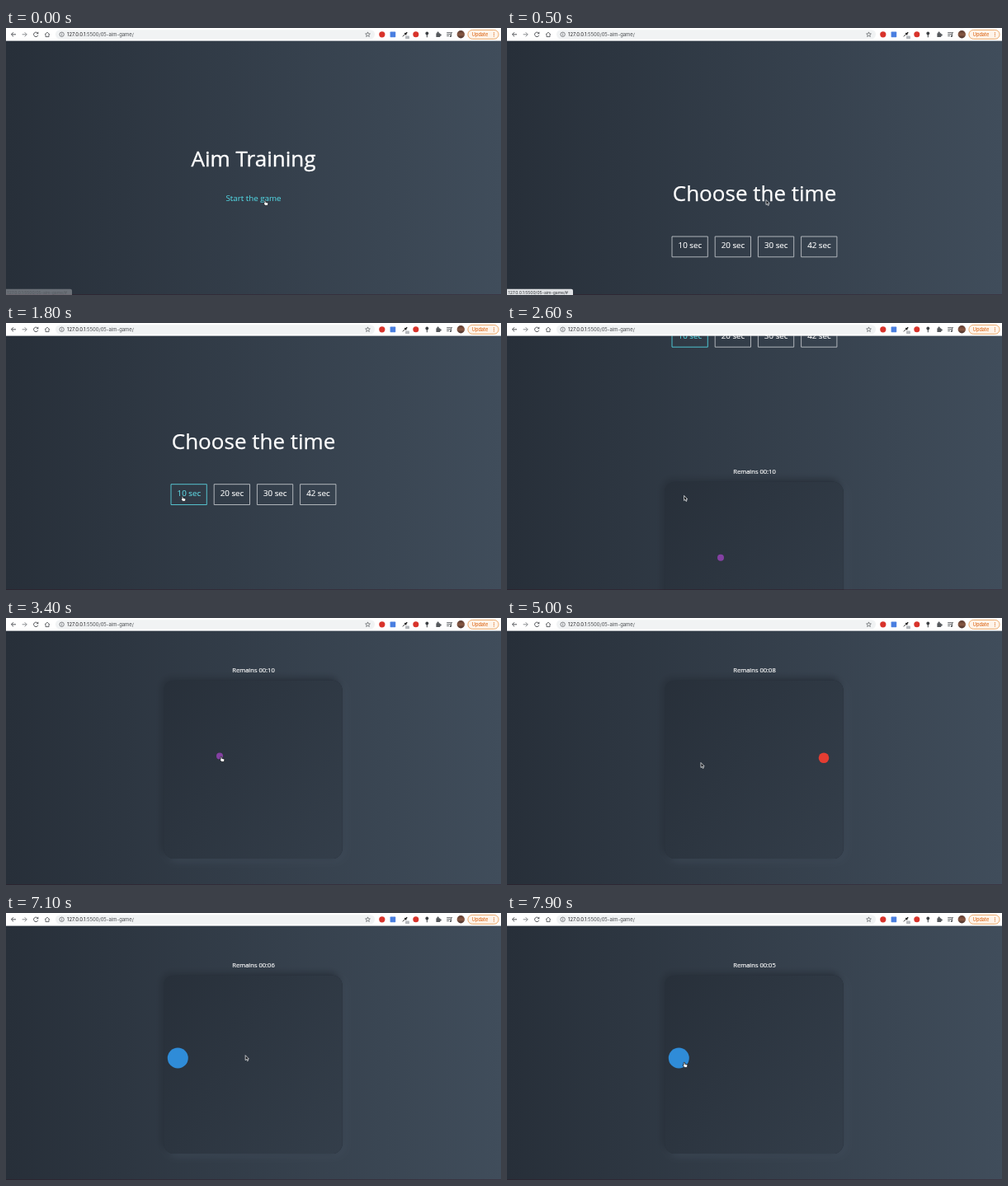
These frames come from a looping animation (600 by 324 pixels, 8 s). An HTML page with a canvas:

```html
<!DOCTYPE html>
<html lang="en">
<head>
<meta charset="utf-8">
<title>Aim Training</title>
<style>
  html, body { margin: 0; width: 100%; height: 100%; overflow: hidden; background: #272f39; }
  canvas { display: block; }
</style>
</head>
<body>
<canvas id="stage" width="600" height="324"></canvas>
<script>
const ctx = document.getElementById('stage').getContext('2d');
const W = 600, H = 324, BAR = 15.5, PAGE = H - BAR, LOOP = 8000;
const DARK = '#272f39', LIGHT = '#404d5b', ICON = '#55585c';
const WHITE = [255, 255, 255], SILVER = [190, 194, 199], CYAN = [82, 210, 222];
const PAGE_FONT = '"Open Sans", "Noto Sans", sans-serif';
const UI_FONT = 'Inter, Roboto, sans-serif';

const SLIDE_MS = 500, FIRST_SLIDE = 185, SECOND_SLIDE = 2380, GAME_START = 2420;
const CIRCLE_TOP = 163.5;

// Targets: appears, hit, centre x, radius, colour
const circles = [
  [GAME_START, 3470, 259, 4, '#8440a2'],
  [3470, 4100, 318, 7, '#e43d32'],
  [4100, 4950, 224.5, 12.5, '#2f8cd8'],
  [4950, 5560, 384, 6.3, '#e43d32'],
  [5560, 6150, 272, 6, '#8440a2'],
  [6150, 6800, 314.3, 5.4, '#55b472'],
  [6800, LOOP, 208.3, 12.5, '#2f8cd8']
];

// Pointer tip: time, x, y
const pointerPath = [
  [0, 314, 209], [500, 314, 208.5], [950, 314, 153], [1750, 214, 210],
  [2550, 214, 210], [3300, 261, 168], [3480, 261, 168], [4000, 318, 169],
  [4110, 318, 169], [4800, 235, 175.5], [5080, 235, 175.5], [5500, 384, 171],
  [5580, 384, 171], [6080, 266.5, 172.5], [6200, 266.5, 172.5],
  [6700, 314, 170], [6820, 314, 170], [7700, 215, 181], [LOOP, 215, 181]
];

const clamp = v => Math.min(1, Math.max(0, v));
const smooth = u => u * u * (3 - 2 * u);
const mix = (a, b, u) => `rgb(${a.map((v, i) => Math.round(v + (b[i] - v) * u))})`;

// CSS ease-out: cubic-bezier(0, 0, .58, 1)
function easeOut(x) {
  let lo = 0, hi = 1;
  for (let i = 0; i < 20; i++) {
    const s = (lo + hi) / 2;
    if (1.74 * s * s * (1 - s) + s * s * s < x) lo = s; else hi = s;
  }
  return smooth(lo);
}
const slide = (t, start) => easeOut(clamp((t - start) / SLIDE_MS)) * PAGE;

function pointerAt(t) {
  let i = 0;
  while (i < pointerPath.length - 2 && t >= pointerPath[i + 1][0]) i++;
  const [t0, x0, y0] = pointerPath[i], [t1, x1, y1] = pointerPath[i + 1];
  const u = smooth(clamp((t - t0) / (t1 - t0)));
  return [x0 + (x1 - x0) * u, y0 + (y1 - y0) * u];
}

function text(str, x, y, size, color, { align = 'center', font = PAGE_FONT, weight = 400, heavy = 0 } = {}) {
  ctx.font = `${weight} ${size}px ${font}`;
  ctx.textAlign = align;
  ctx.fillStyle = color;
  ctx.fillText(str, x, y);
  if (heavy) {
    ctx.lineWidth = heavy;
    ctx.lineJoin = 'round';
    ctx.strokeStyle = color;
    ctx.strokeText(str, x, y);
  }
}

function disc(x, y, r, color) {
  ctx.fillStyle = color;
  ctx.beginPath();
  ctx.arc(x, y, r, 0, Math.PI * 2);
  ctx.fill();
}

function box(x, y, w, h, r, fill, stroke, width = 0.8) {
  ctx.beginPath();
  ctx.roundRect(x, y, w, h, r);
  if (fill) { ctx.fillStyle = fill; ctx.fill(); }
  if (stroke) { ctx.strokeStyle = stroke; ctx.lineWidth = width; ctx.stroke(); }
}

function shape(d, stroke, width = 1, fill) {
  const p = new Path2D(d);
  if (fill) { ctx.fillStyle = fill; ctx.fill(p); }
  if (stroke) {
    ctx.strokeStyle = stroke;
    ctx.lineWidth = width;
    ctx.lineJoin = 'round';
    ctx.stroke(p);
  }
}

function drawBar() {
  ctx.fillStyle = '#fff';
  ctx.fillRect(0, 0, W, BAR);
  ctx.fillStyle = '#c9ccd0';
  ctx.fillRect(0, BAR - 0.5, W, 0.5);

  shape('M12 7.8H6.6M9 5.2L6.4 7.8L9 10.4', ICON);
  shape('M19.6 7.8H25M22.6 5.2L25.2 7.8L22.6 10.4', '#8b8e92');
  shape('M38.4 6.2A2.7 2.7 0 1 0 38.8 8.8', ICON);
  shape('M39.3 4.6V7.3H36.6Z', null, 0, ICON);
  shape('M47 8L50 5.2L53 8M48 7.4V10.6H52V7.4', ICON, 0.9);

  box(60, 2.2, 387, 11.2, 5.6, '#f1f3f4');
  shape('M70.3 7.8A2.7 2.7 0 1 1 64.9 7.8A2.7 2.7 0 1 1 70.3 7.8M67.6 7.4V9.4M67.6 6V6.7', ICON, 0.7);
  const ui = { align: 'left', font: UI_FONT };
  const host = '127.0.0.1';
  text(host, 74, 10, 5.9, '#202124', ui);
  const hostWidth = ctx.measureText(host).width;
  text(':5500/05-aim-game/', 74 + hostWidth, 10, 5.9, '#4a4d51', ui);
  shape('M438.5 4.9L439.3 6.9L441.4 7L439.8 8.4L440.3 10.5L438.5 9.3L436.7 10.5L437.2 8.4L435.6 7L437.7 6.9Z', ICON, 0.7);

  disc(455.8, 7.8, 3.6, '#d8332b');
  box(465.6, 4.6, 6.6, 6.6, 0.6, '#4a7fe0');
  shape('M480.8 10.4L484 7.2', '#333', 1);
  shape('M483.2 6.2L485.2 8.2M484.4 7L486.2 5.2', '#222', 1.6);
  box(484, 9.4, 5, 3.8, 0.8, '#b6b9bd');
  disc(496.8, 7.8, 3.5, '#d8332b');
  disc(510.3, 6.5, 1.9, '#3b3e42');
  shape('M510.3 7.5V11.3', '#3b3e42', 1);
  box(521.4, 6.2, 4.8, 4.8, 0.5, ICON);
  disc(523.6, 5.7, 1.2, ICON);
  disc(526.5, 8.5, 1.2, ICON);
  shape('M534.2 5.6H539.4M534.2 7.6H539.4M534.2 9.6H537M539.7 10V5.6H541', ICON, 0.9);
  disc(538.9, 9.9, 1.1, ICON);

  const skin = ctx.createLinearGradient(0, 3, 0, 13);
  skin.addColorStop(0, '#5a3a30');
  skin.addColorStop(0.5, '#8a5a45');
  skin.addColorStop(1, '#3c2a28');
  disc(551.3, 7.8, 4.7, skin);

  box(559.9, 2.4, 37.2, 10.9, 5.4, '#fef4ea', '#e8964a', 0.8);
  text('Update', 564.8, 9.9, 5.6, '#dc6a1c', { ...ui, weight: 500 });
  for (const y of [5.8, 7.9, 10]) disc(591.4, y, 0.6, '#dc6a1c');
}

function drawIntro(linkHover) {
  text('Aim Training', 300, 167.7, 26, '#fff', { heavy: 0.4 });
  text('Start the game', 300, 209.8, 9.77, mix(WHITE, CYAN, linkHover), { heavy: 0.1 });
}

function drawTimes(hover) {
  text('Choose the time', 300, 152.5, 26, '#fff', { heavy: 0.25 });
  [10, 20, 30, 42].forEach((sec, i) => {
    const x = 200 + i * 52.2, lit = i ? 0 : hover;
    box(x, 195.7, 43.3, 24.8, 0, null, mix(SILVER, CYAN, lit), 0.9);
    text(sec + ' sec', x + 21.8, 210, 9.77, mix(WHITE, CYAN, lit), { heavy: 0.15 });
  });
}

function drawBoard() {
  const x = 191.3, y = 75.7, size = 216.4;
  const angle = 118.38 * Math.PI / 180;
  const dx = Math.sin(angle), dy = -Math.cos(angle), len = size * (dx + dy);
  const at = f => [x + size / 2 + dx * len * (f - 0.5), y + size / 2 + dy * len * (f - 0.5)];
  const fill = ctx.createLinearGradient(...at(-0.046), ...at(2.0044));
  fill.addColorStop(0, DARK);
  fill.addColorStop(1, LIGHT);

  for (const [color, ox, oy] of [['#3c4856', 4.1, 2.9], ['#272f39', -3.3, -3.3]]) {
    ctx.save();
    ctx.shadowColor = color;
    ctx.shadowOffsetX = ox;
    ctx.shadowOffsetY = oy;
    ctx.shadowBlur = 8.2;
    box(x, y, size, size, 12.5, DARK);
    ctx.restore();
  }
  box(x, y, size, size, 12.5, fill);
}

function drawGame(t) {
  const left = 10 - Math.floor(Math.max(0, t - GAME_START) / 1000);
  const shown = t < GAME_START ? '00:00' : '00:' + String(left).padStart(2, '0');
  text('Remains ' + shown, 300, 65.5, 7.55, '#fff', { heavy: 0.2 });
  drawBoard();
  const live = circles.find(c => t >= c[0] && t < c[1]);
  if (live) disc(live[2], CIRCLE_TOP + live[3], live[3], live[4]);
}

function drawStatus(t) {
  const alpha = t < 100 ? 0.35 + 0.65 * t / 100 : 1 - clamp((t - 620) / 230);
  if (alpha <= 0) return;
  ctx.save();
  ctx.globalAlpha = alpha;
  box(-1, 316.8, 81, 9, [0, 2, 0, 0], '#dfe1e4');
  text('127.0.0.1:5500/05-aim-game/#', 1.6, 322.7, 5.05, '#35383c', { align: 'left', font: UI_FONT });
  ctx.restore();
}

function overTarget(t, x, y) {
  if (t < 280) return true;
  if (t < SECOND_SLIDE + 120) return t > 1000 && x > 200 && x < 243 && y > 195.7;
  const live = circles.find(c => t >= c[0] && t < c[1]);
  return !!live && Math.hypot(x - live[2], y - CIRCLE_TOP - live[3]) < live[3];
}

function drawPointer(t) {
  const [x, y] = pointerAt(t);
  ctx.save();
  ctx.translate(x, y);
  if (overTarget(t, x, y)) {
    shape('M-.9 .6Q0 -.4 .8 .6V2.4L3.2 2.9Q4 3.2 3.9 4L3.4 6.4H.2L-2 4Q-1.9 3.1 -.9 3.6Z', '#14181d', 0.8, '#fff');
  } else {
    shape('M0 0V6L1.4 4.8L2.4 7L3.4 6.5L2.5 4.4H4.2Z', '#e8eaec', 0.8, '#0b0d10');
  }
  ctx.restore();
}

function drawPage(t) {
  const bg = ctx.createLinearGradient(0, 0, W, 0);
  bg.addColorStop(0, DARK);
  bg.addColorStop(1, LIGHT);
  ctx.fillStyle = bg;
  ctx.fillRect(0, 0, W, H);

  const scroll = slide(t, FIRST_SLIDE) + slide(t, SECOND_SLIDE);
  const screens = [
    () => drawIntro(1 - clamp((t - 280) / 150)),
    () => drawTimes(clamp((t - 1560) / 260)),
    () => drawGame(t)
  ];
  screens.forEach((draw, i) => {
    const offset = i * PAGE - scroll;
    if (Math.abs(offset) >= PAGE) return;
    ctx.save();
    ctx.translate(0, offset);
    draw();
    ctx.restore();
  });
  ctx.fillStyle = 'rgba(50, 22, 34, .4)';
  ctx.fillRect(0, H - 1, W, 1);
}

function frame(now) {
  const t = now % LOOP;
  drawPage(t);
  drawStatus(t);
  drawBar();
  drawPointer(t);
  requestAnimationFrame(frame);
}
requestAnimationFrame(frame);
</script>
</body>
</html>
```
